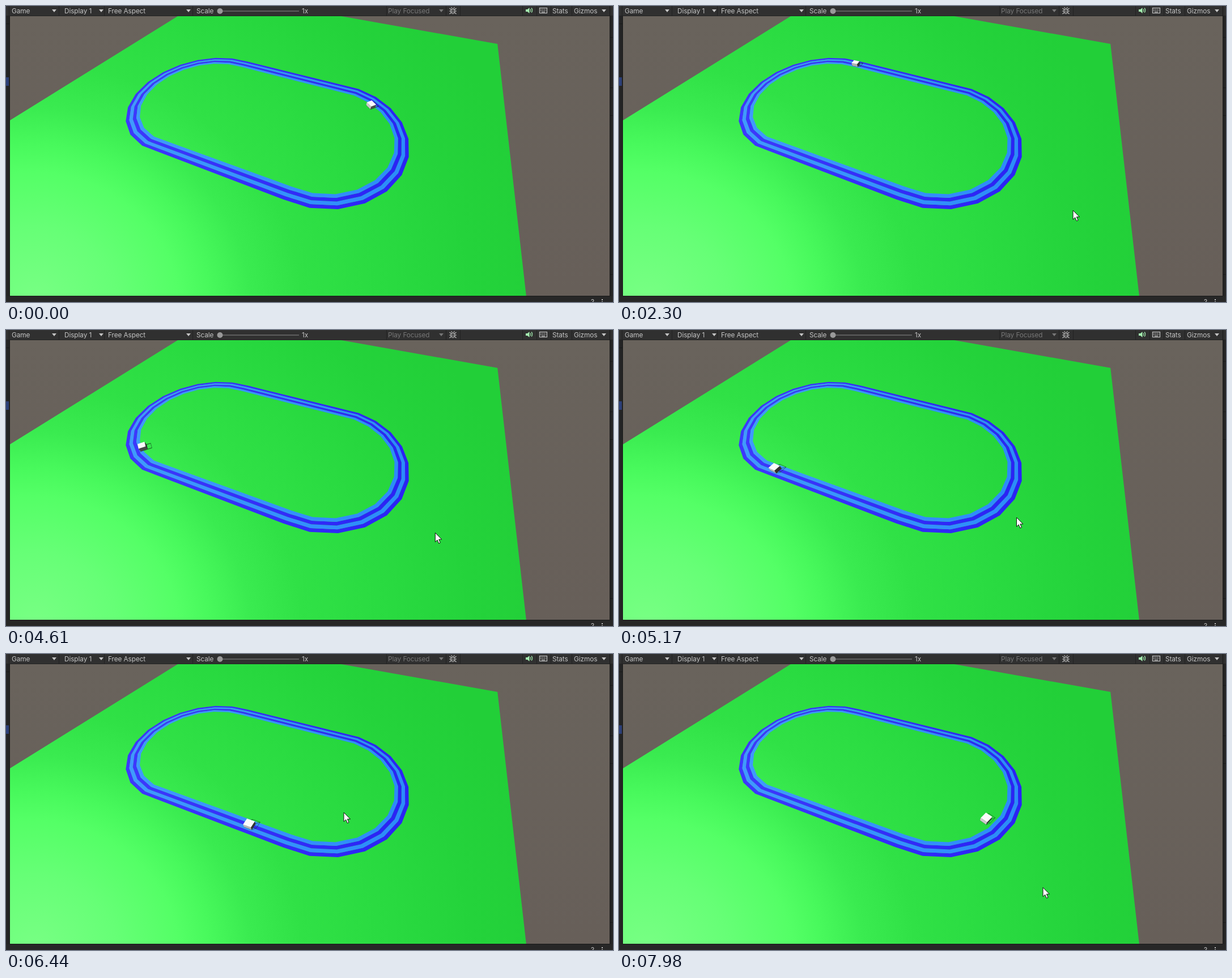
These frames come from a looping animation (1071x523 px, 8000 ms). An HTML page:

```html
<!DOCTYPE html>
<html lang="en">
<head>
<meta charset="utf-8">
<title>Game view</title>
<style>
  html, body { margin: 0; width: 100%; height: 100%; overflow: hidden; background: #282828; }
  svg { display: block; width: 1071px; height: 523px; }
  text { font: 11.8px Inter, "Liberation Sans", sans-serif; letter-spacing: -.08px; fill: #c4c4c4; }
  .dim { fill: #777; }
</style>
</head>
<body>
<svg viewBox="0 0 1071 523" xmlns="http://www.w3.org/2000/svg">
  <defs>
    <radialGradient id="grass" gradientUnits="userSpaceOnUse" cx="0" cy="0" r="3"
      gradientTransform="translate(50 520) rotate(10) scale(305 270)">
      <stop offset="0" stop-color="#78ff84"/>
      <stop offset=".16" stop-color="#66ff76"/>
      <stop offset=".28" stop-color="#54ff66"/>
      <stop offset=".34" stop-color="#48f95c"/>
      <stop offset=".42" stop-color="#3aeb50"/>
      <stop offset=".52" stop-color="#30e146"/>
      <stop offset=".67" stop-color="#2adb41"/>
      <stop offset=".85" stop-color="#24d33b"/>
      <stop offset="1" stop-color="#22cf38"/>
    </radialGradient>
    <linearGradient id="sky" x1="0" y1="0" x2="0" y2="1">
      <stop offset="0" stop-color="#69635c"/>
      <stop offset="1" stop-color="#675f59"/>
    </linearGradient>
    <linearGradient id="dark" gradientUnits="userSpaceOnUse" x1="211" y1="0" x2="710" y2="0">
      <stop offset="0" stop-color="#3d38ff"/>
      <stop offset="1" stop-color="#2a22f5"/>
    </linearGradient>
    <linearGradient id="light" gradientUnits="userSpaceOnUse" x1="211" y1="0" x2="710" y2="0">
      <stop offset="0" stop-color="#409aff"/>
      <stop offset="1" stop-color="#2b8bfa"/>
    </linearGradient>
    <clipPath id="view"><rect x="7" y="18" width="1058" height="494"/></clipPath>
  </defs>

  <rect width="1071" height="523" fill="#282828"/>
  <g clip-path="url(#view)">
    <rect x="7" y="18" width="1058" height="495" fill="url(#sky)"/>
    <path id="field" fill="url(#grass)"/>
    <g id="track"></g>
    <path id="shadow" fill="#143f1b" stroke="#143f1b" stroke-width=".3"/>
    <g id="car"></g>
  </g>

  <!-- editor frame -->
  <rect width="1071" height="18" fill="#303030"/>
  <rect y="17" width="1071" height="1" fill="#232323"/>
  <path d="M0 18H6V523H0Z M1066 18H1071V523H1066Z" fill="#242424"/>
  <path d="M6.500 18V512.500H1065.500V0" fill="none" stroke="#191919"/>
  <rect y="126" width="5" height="15" fill="#2c3f78"/>
  <path d="M0 31.500H6M1066 55.500H1071M1066 144.500H1071M1066 193.500H1071M1066 474.500H1071" stroke="#191919"/>
  <rect y="513" width="1071" height="10" fill="#272727"/>
  <g id="dividers" stroke="#222"></g>
  <g id="labels"></g>
  <path d="M81 6h8l-4 5zM164 6h8l-4 5zM318 6h8l-4 5zM1051 6h8l-4 5z" fill="#c4c4c4"/>
  <path d="M764 6h8l-4 5z" fill="#777"/>
  <path d="M378 9H517" stroke="#5e5e5e" stroke-width="2"/>
  <circle cx="377.500" cy="9" r="5" fill="#999"/>
  <path d="M1051 518h2v2h-2zM1051 522h2v1h-2z" fill="#c4c4c4"/>

  <!-- toolbar icons -->
  <g fill="none" stroke="#c0c0c0" stroke-width="1.200">
    <ellipse cx="788.500" cy="9" rx="3.500" ry="4.500"/>
    <path d="M785 7h7M785 10.500h7M785 6l-2.500-2M792 6l2.500-2M785 9h-3M792 9h3M785 12l-2.500 2M792 12l2.500 2M787 4l-1.500-2M790 4l1.500-2"/>
    <rect x="941.500" y="3.500" width="13" height="9"/>
    <path d="M943 6h10M943 8.500h10" stroke-dasharray="2 1"/>
    <path d="M945 10.800h6"/>
  </g>
  <path d="M917 6h3l3.500-3v10l-3.500-3h-3z" fill="#a4eeb0"/>
  <path d="M925 5.500q2 2 0 5M927 3.500q3.500 4 0 8" fill="none" stroke="#a4eeb0" stroke-width="1.200"/>

  <path id="cursor" d="M0 0V16.200L3.700 12.700 6.300 18.800 9 17.600 6.400 11.700H11.500Z" fill="#fff" stroke="#111" stroke-linejoin="round"/>
</svg>
<script>
const LOOP = 8000, STEP = 70, LAG = 20;
const $ = id => document.getElementById(id);
const mix = (a, b, k) => a + (b - a) * k;
const rad = deg => deg * Math.PI / 180;

function add(parent, tag, attrs, text = "") {
  const el = document.createElementNS("http://www.w3.org/2000/svg", tag);
  for (const key in attrs) el.setAttribute(key, attrs[key]);
  el.textContent = text;
  $(parent).append(el);
  return el;
}

for (const x of [5, 93, 173, 329, 671, 776, 801, 911, 936, 961, 998])
  add("dividers", "path", { d: `M${x + .5} 0V17` });
const labels = { "Game": 10, "Display 1": 103, "Free Aspect": 180, "Scale": 336, "1x": 522,
  "Play Focused": 674, "Stats": 964, "Gizmos": 1002 };
for (const [name, x] of Object.entries(labels))
  add("labels", "text", { x, y: 12.5, class: name === "Play Focused" ? "dim" : "" }, name);
add("labels", "text", { x: 1032, y: 527 }, "?");

// Camera one unit above the ground, 60 degree lens, tilted down (sine .8) and turned.
const LENS = 247.5 / Math.tan(rad(30)), TURN = rad(22);

// World: u along the straights, w across them, h up.
function project([u, w, h = 0]) {
  const side = u * Math.cos(TURN) + w * Math.sin(TURN);
  const ahead = w * Math.cos(TURN) - u * Math.sin(TURN);
  const drop = 1 - h;
  const depth = ahead * .6 + drop * .8;
  return [536 + LENS * side / depth, 265.5 - LENS * (ahead * .8 - drop * .6) / depth];
}
const shape = pts =>
  "M" + pts.map(p => project(p).map(v => v.toFixed(2)).join(" ")).join("L") + "Z";

const MID = [-.662, .874];
$("field").setAttribute("d", shape([[-1.988, -.386], [-1.988, 2.2775], [.6755, 2.2775], [.6755, -.386]]));

// Two arcs of 12 corners each, the second a half turn of the first.
function ring(radius) {
  return Array.from({ length: 24 }, (_, i) => {
    const sign = i < 12 ? 1 : -1, a = rad(9 + 16 * (i % 12));
    return [MID[0] + sign * (.401 + radius * Math.sin(a)), MID[1] + sign * radius * Math.cos(a)];
  });
}
const edge = i => shape(ring(mix(.453, .378, i / 4)));
for (let i = 0; i < 4; i++)
  add("track", "path", { d: edge(i) + edge(i + 1), "fill-rule": "evenodd", fill: `url(#${i % 2 ? "light" : "dark"})` });

// Oval drive at constant speed; each half lap is one straight and one arc.
const DRIVE = { half: .3325, radius: .405, speed: .421, start: -.276 };
function drive(sec) {
  const { half, radius, speed, start } = DRIVE;
  const lap = 2 * half + Math.PI * radius, s = start + speed * sec;
  const n = Math.floor(s / lap), d = s - n * lap, sign = n % 2 ? -1 : 1;
  const a = Math.max(0, d - 2 * half) / radius;
  const u = half - Math.min(d, 2 * half) - radius * Math.sin(a);
  return {
    at: [MID[0] - .0055 + sign * u, MID[1] + sign * radius * Math.cos(a)],
    dir: [-sign * Math.cos(a), -sign * Math.sin(a)]
  };
}

const CAR = { length: .043, width: .037, height: .021 };
const SHADE = [.016, .016];
const faces = Array.from({ length: 5 }, () => add("car", "path", {}));

function drawCar(sec) {
  const { at: [u, w], dir: [du, dw] } = drive(sec);
  const corner = (f, s, h) => {
    const x = f * CAR.length / 2, y = s * CAR.width / 2;
    return [u + du * x - dw * y, w + dw * x + du * y, h];
  };
  const box = h => [[1, 1], [-1, 1], [-1, -1], [1, -1]].map(([f, s]) => corner(f, s, h));
  const base = box(0), roof = box(CAR.height);
  const cast = base.map(p => [p[0] + SHADE[0], p[1] + SHADE[1]]);
  let dark = shape(cast);
  base.forEach((p, i) => {
    const j = (i + 1) % 4;
    dark += shape([p, base[j], cast[j], cast[i]]);
    // Outward normal, hidden when it points away from the camera at the origin.
    const nu = base[j][1] - p[1], nw = p[0] - base[j][0], size = Math.hypot(nu, nw);
    const seen = -(nu * p[0] + nw * p[1]) * -1 < 0;
    const lit = Math.max(0, -(nu * .5 + nw * .86) / size);
    const tone = Math.round(mix(50, 205, lit));
    faces[i].setAttribute("d", seen ? shape([p, base[j], roof[j], roof[i]]) : "");
    faces[i].setAttribute("fill", `rgb(${tone},${tone},${tone})`);
  });
  $("shadow").setAttribute("d", dark);
  faces[4].setAttribute("d", shape(roof));
  faces[4].setAttribute("fill", "#fbfbfb");
}

// Pointer stops: time, x, y of the tip; it gathers speed between them.
const stops = [[2030,1022,508], [2310,801,361], [2520,755,349], [3360,767,363], [4270,767,363],
  [5740,596,280], [6790,596,280], [7070,602.5,284.5], [7560,735,352], [7980,748,412.5]];

function drawPointer(t) {
  const next = Math.max(1, stops.findIndex(p => p[0] >= t));
  const [t0, x0, y0] = stops[next - 1], [t1, x1, y1] = stops[next];
  const k = ((t - t0) / (t1 - t0)) ** 2;
  $("cursor").setAttribute("transform", `translate(${mix(x0, x1, k)} ${mix(y0, y1, k)})`);
  $("cursor").setAttribute("visibility", t < stops[0][0] ? "hidden" : "visible");
}

const start = performance.now();
function tick() {
  const ms = (performance.now() - start) % LOOP;
  const t = Math.min(7980, Math.floor((ms + LAG) / STEP) * STEP);
  drawCar(t / 1000);
  drawPointer(t);
  requestAnimationFrame(tick);
}
tick();
</script>
</body>
</html>
```
